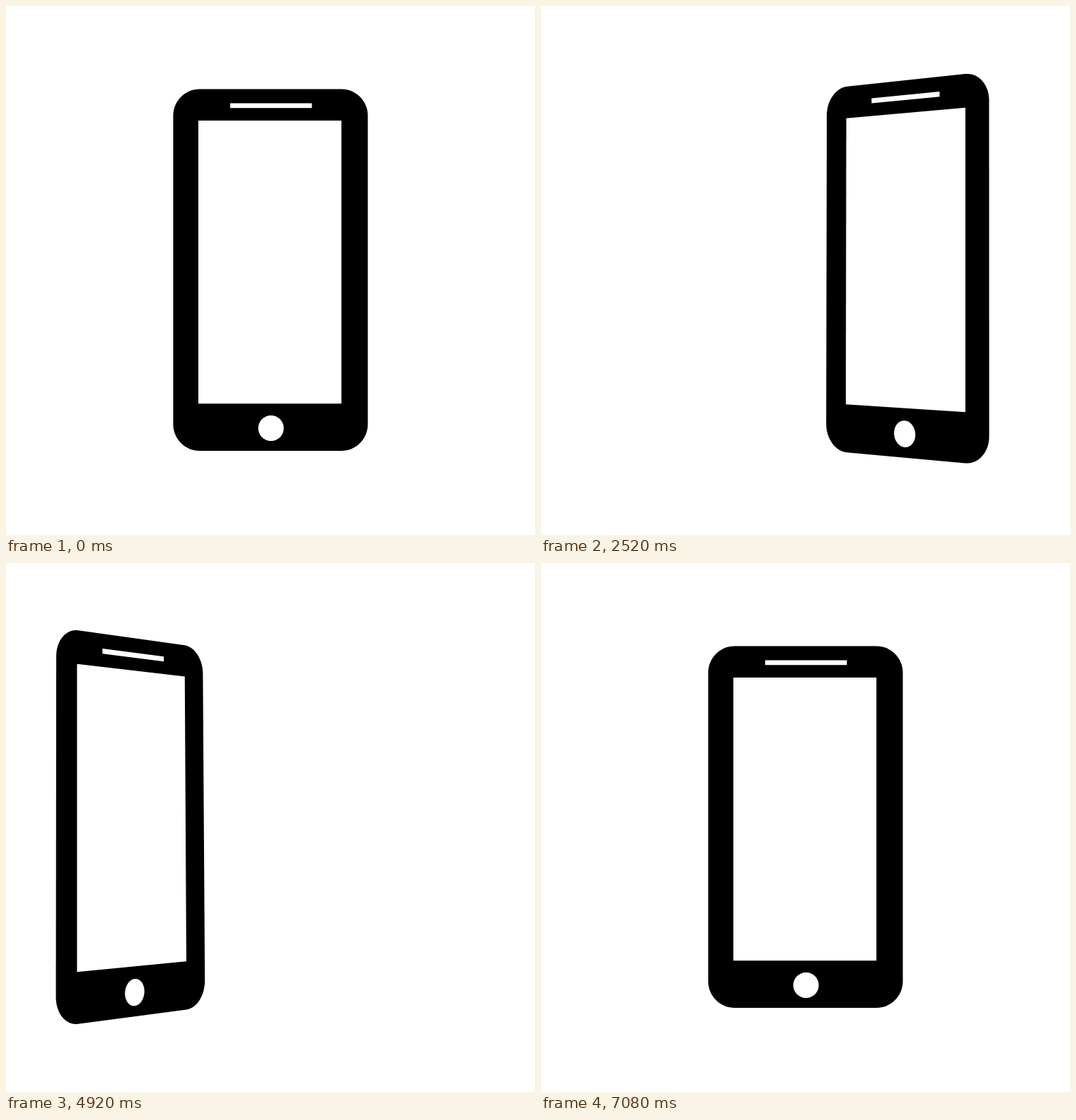
Write an HTML page with a canvas that moves like this. It is 748 px wide and 748 px high and loops after 7200 ms.

```html
<!DOCTYPE html>
<html lang="en">
<head>
<meta charset="utf-8">
<title>Turning phone</title>
<style>
  html, body { margin: 0; width: 100%; height: 100%; overflow: hidden; background: #fff; }
  canvas { display: block; }
</style>
</head>
<body>
<canvas id="stage" width="748" height="748"></canvas>
<script>
const ctx = document.getElementById('stage').getContext('2d');
const STEP = 120, STEPS = 60;
const LEFT = 272, RIGHT = 474.3, TOP = 117.5, BOTTOM = 629;

// 0 faces the viewer, 1 is fully right, -1 fully left.
function turnAt(step) {
  if (step <= 30) return 1 - Math.abs(step - 15) / 15;
  return step <= 44 ? -(step - 30) / 14 : -(59 - step) / 15;
}

// Clockwise from the top left.
function cornersAt(turn) {
  const u = Math.abs(turn), q = u * u;
  if (turn >= 0) {
    const l = LEFT + 265.5 * u, r = RIGHT + 192 * u + 29.5 * q;
    return [
      [l + 0.7 * u, TOP - 6 * u],
      [r, TOP - 33 * u - 4.5 * q],
      [r, BOTTOM + 28 * u + 1.8 * q],
      [l - 0.7 * u, BOTTOM + 3.4 * u]
    ];
  }
  const l = LEFT - 216 * u - 3 * q, r = RIGHT - 301.4 * u + 26.7 * q;
  return [
    [l, TOP - 28.5 * u],
    [r - 1.8 * u, TOP - 1.5 * u],
    [r + 1.8 * u, BOTTOM + 3.2 * u],
    [l, BOTTOM + 29.3 * u]
  ];
}

// Maps points of the flat phone into the four given corners.
function perspective([[x0, y0], [x1, y1], [x2, y2], [x3, y3]]) {
  const sx = x0 - x1 + x2 - x3, sy = y0 - y1 + y2 - y3;
  const ax = x1 - x2, ay = y1 - y2, bx = x3 - x2, by = y3 - y2;
  const det = ax * by - bx * ay;
  const g = (sx * by - bx * sy) / det, h = (ax * sy - sx * ay) / det;
  return ([x, y]) => {
    const s = (x - LEFT) / (RIGHT - LEFT), t = (y - TOP) / (BOTTOM - TOP);
    const w = 1 + g * s + h * t;
    return [
      (x0 + (x1 - x0 + g * x1) * s + (x3 - x0 + h * x3) * t) / w,
      (y0 + (y1 - y0 + g * y1) * s + (y3 - y0 + h * y3) * t) / w
    ];
  };
}

// Outline points of a rectangle with optional round corners.
function box(left, top, right, bottom, radius = 0) {
  const centres = [
    [right - radius, bottom - radius], [left + radius, bottom - radius],
    [left + radius, top + radius], [right - radius, top + radius]
  ];
  const n = radius ? 16 : 0;
  return centres.flatMap(([cx, cy], corner) =>
    Array.from({ length: n + 1 }, (_, i) => {
      const angle = (corner + (n ? i / n : 0)) * Math.PI / 2;
      return [cx + radius * Math.cos(angle), cy + radius * Math.sin(angle)];
    }));
}

const shapes = [
  ['#000', box(236.4, TOP, 511.6, BOTTOM, 37.5)],
  ['#fff', box(272, 162, 474.3, 562.3)],
  ['#fff', box(317, 137.5, 432.5, 144.3)],
  ['#fff', box(356.7, 579, 392.7, 615, 18)]
];

function draw(time) {
  const project = perspective(cornersAt(turnAt(Math.floor(time / STEP) % STEPS)));
  ctx.fillStyle = '#fff';
  ctx.fillRect(0, 0, 748, 748);
  for (const [colour, points] of shapes) {
    ctx.fillStyle = colour;
    ctx.beginPath();
    for (const point of points) ctx.lineTo(...project(point));
    ctx.fill();
  }
}

const start = performance.now();
function tick() {
  draw(performance.now() - start);
  requestAnimationFrame(tick);
}
tick();
</script>
</body>
</html>
```
